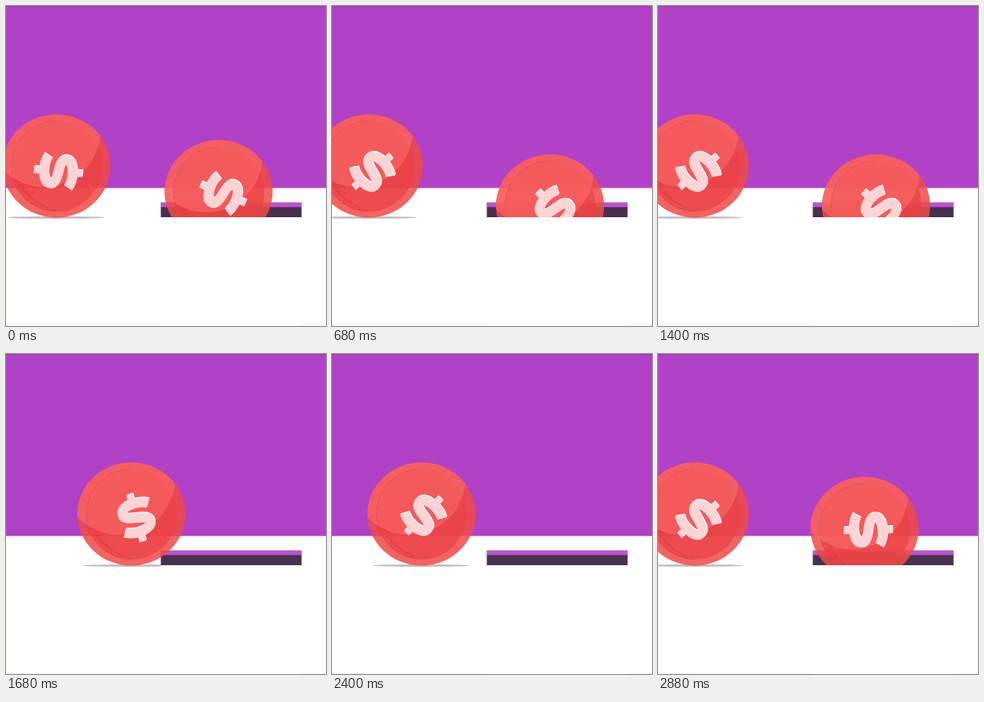
An HTML page with a canvas for the animation above (2.92 s loop, 400 px wide and 400 px high).

```html
<!DOCTYPE html>
<html>
<head>
<meta charset="utf-8">
<style>
html, body { margin: 0; width: 100%; height: 100%; overflow: hidden; background: #fff; }
canvas { display: block; }
</style>
</head>
<body>
<canvas id="stage" width="400" height="400"></canvas>
<script>
const ctx = document.getElementById('stage').getContext('2d');
const STEP = 40, STEPS = 73, FALL = 19, RX = 67.6, RY = 64.5;
const launches = [11, 29, 50, 66];

const letter = new Path2D('M19 -14 C13 -17.4 7 -18 3 -18 C-6 -18 -15.5 -16 -15.5 -8.5 ' +
  'C-15.5 3.5 15.5 -3.5 15.5 8.5 C15.5 16 6 18 -3 18 C-7 18 -13 17.4 -19 14');
const bars = new Path2D('M-4.3 -30.5h8.6v10h-8.6z M-4.3 20.5h8.6v10h-8.6z');

const rollX = n => -62 + 18.59 * n - 0.0681 * n * n - 0.00524 * n ** 3;
const spin = n => (-239.6 + 50.57 * n - 0.3395 * n * n - 0.0075 * n ** 3) * Math.PI / 180;
const fallY = n => 200 + 2 * Math.max(0, n - FALL) ** 2;

function rect(color, x, y, w, h) {
  ctx.fillStyle = color;
  ctx.fillRect(x, y, w, h);
}

function disc(color, x, y, rx, ry = rx) {
  ctx.fillStyle = color;
  ctx.beginPath();
  ctx.ellipse(x, y, rx, ry, 0, 0, 7);
  ctx.fill();
}

// dashed groove on the left, slanted hatching at the lower left
function milling() {
  ctx.strokeStyle = 'rgba(205,50,55,.35)';
  ctx.lineWidth = 1;
  ctx.setLineDash([5, 2]);
  ctx.beginPath();
  ctx.arc(0, 0, 56, 1.6, 4.7);
  ctx.stroke();
  ctx.setLineDash([]);
  ctx.lineWidth = 1.3;
  ctx.beginPath();
  for (let a = 1.95; a < 2.8; a += 0.1) {
    const x = 54 * Math.cos(a), y = 54 * Math.sin(a);
    ctx.moveTo(x, y - 3);
    ctx.lineTo(x + 10, y + 3);
  }
  ctx.stroke();
}

function sign(color, dx, dy, angle) {
  ctx.save();
  ctx.translate(3.5 + dx, 4.5 + dy);
  ctx.rotate(angle);
  ctx.translate(2.5, 1);
  ctx.strokeStyle = ctx.fillStyle = color;
  ctx.lineWidth = 12;
  ctx.stroke(letter);
  ctx.fill(bars);
  ctx.restore();
}

function coin(n) {
  ctx.save();
  ctx.translate(rollX(n), fallY(n));
  disc('rgba(240,75,72,.86)', 0, 0, RX, RY);
  disc('rgba(236,64,69,.7)', 0, 0, 57);

  ctx.save();
  ctx.beginPath();
  ctx.ellipse(0, 0, RX, RY, 0, 0, 7);
  ctx.clip();
  disc('rgba(255,115,110,.5)', -16, -45, 71);
  ctx.restore();

  milling();
  const angle = spin(n);
  sign('#fff', 0.7, -1, angle);
  sign('#fcd4d6', 0, 0.3, angle);
  ctx.restore();
}

function draw(step) {
  rect('#fff', 0, 0, 400, 400);
  rect('#b141c6', 0, 0, 400, 227.5);
  rect('#9d3bb1', 0, 0, 400, 1);
  rect('#f3f3f3', 0, 399, 400, 1);

  const ages = launches.map(l => (step - l + 2 + STEPS) % STEPS - 2).filter(n => n < 28);
  for (const n of ages) disc('#c6bfbf', rollX(n) - 0.5, 264.4, 60.5, 1.5);

  rect('#b141c6', 193.5, 245.5, 176, 6.5);
  for (let x = 195; x < 369; x += 2) rect('rgba(255,255,255,.2)', x, 246, 1, 5);
  rect('#48304f', 193.5, 251.5, 176, 13);

  ages.forEach(coin);
  rect('#fff', 193.5, 264, 176, 136);
}

const start = performance.now();
function tick() {
  draw(Math.floor((performance.now() - start) / STEP) % STEPS);
  requestAnimationFrame(tick);
}
tick();
</script>
</body>
</html>
```
